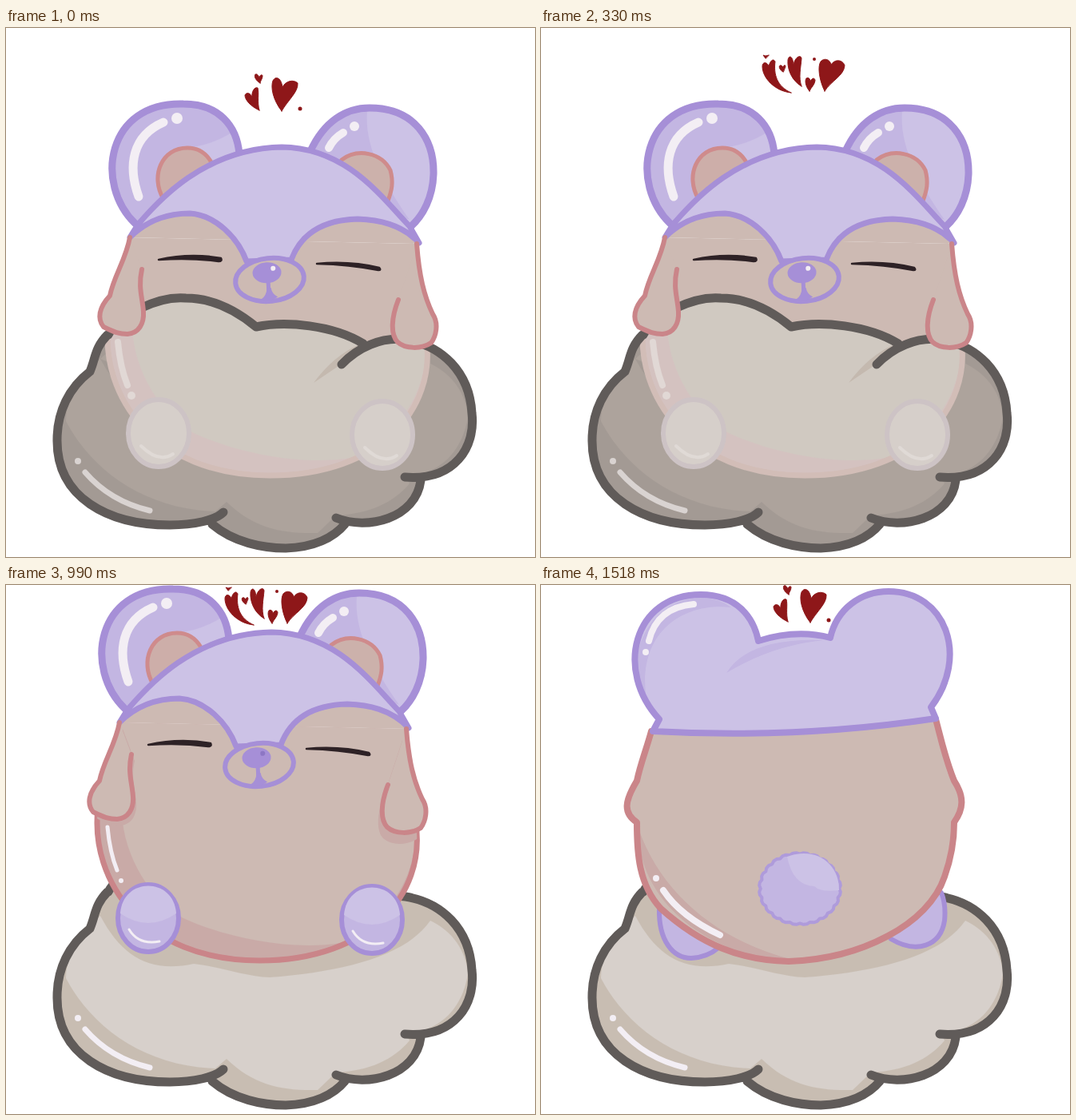
An HTML page for the animation above (1650 ms loop, 662 by 662 pixels).

```html
<!DOCTYPE html>
<html lang="en">
<head>
<meta charset="utf-8">
<title>Sleepy bear on a cloud</title>
<style>
html, body { margin: 0; width: 100%; height: 100%; overflow: hidden; background: #fff; }
svg { display: block; width: 100vw; height: 100vh; }
</style>
</head>
<body>
<svg id="stage" viewBox="0 0 662 662" stroke-linecap="round" stroke-linejoin="round"></svg>
<script>
const STEP = 330;
const lilac = '#ccc2e6', lilacDim = '#c3b6e2', violet = '#a68fd7';
const skin = '#cdbab3', blush = '#c9aaa7', rose = '#ca8589';
const ink = '#2e2226', shine = '#f3eef4', red = '#8e1719', grey = '#605b59';

const fill = (d, color) => `<path d="${d}" fill="${color}"/>`;
const line = (d, color, width) =>
  `<path d="${d}" fill="none" stroke="${color}" stroke-width="${width}"/>`;
const shape = (d, color, stroke, width) =>
  `<path d="${d}" fill="${color}" stroke="${stroke}" stroke-width="${width}"/>`;
const dot = (x, y, r, color = shine) => `<circle cx="${x}" cy="${y}" r="${r}" fill="${color}"/>`;
const oval = (x, y, rx, ry, color, stroke = 'none', width = 0, turn = 0) =>
  `<ellipse cx="${x}" cy="${y}" rx="${rx}" ry="${ry}" fill="${color}" stroke="${stroke}"
    stroke-width="${width}" transform="rotate(${turn} ${x} ${y})"/>`;
const move = (x, y, content) => `<g transform="translate(${x} ${y})">${content}</g>`;
const clip = (id, content) => `<g clip-path="url(#${id})">${content}</g>`;
const clipDef = (id, d) => `<clipPath id="${id}"><path d="${d}"/></clipPath>`;
const eye = d => shape(d, ink, ink, 2.5);

// Cloud
const cloudLeft = 'M127 384C111 400 112 414 105 430C79 450 64 480 64 515C63 588 128 622 205 622C235 622 262 616 272 606';
const cloudBottom = '258 621C285 644 322 651 350 651C385 650 410 638 424 621';
const cloudCorner = '413 613C452 629 513 614 519 566';
const cloudRight = '499 562C562 567 588 524 583 482C580 430 545 397 500 390';
const cloudShape = `${cloudLeft}L${cloudBottom}L${cloudCorner}L${cloudRight}
  C475 387 455 394 447 395C410 372 350 366 313 374C290 355 260 338 225 338C190 335 140 360 128 384Z`;
const cloudLines = `${cloudLeft}M${cloudBottom}M${cloudCorner}M${cloudRight}C470 386 440 400 420 421
  M128 384C140 360 190 335 225 338C260 338 290 355 313 374C350 366 410 372 447 395`;
const cloudLight = `M118 414C92 440 76 460 75 492C105 550 170 602 262 605L276 593C310 626 345 633 390 632
  L413 610C455 608 485 594 505 570L499 560C550 560 574 520 578 485C574 450 552 430 531 420
  C500 465 420 484 330 491C300 490 270 478 235 474C180 486 145 465 118 414Z`;

function cloud(front, belly = '') {
  const light = front ? '#ada39c' : '#d7d0cb';
  const glow = front ? '#d9d3d1' : shine;
  return fill(cloudShape, front ? '#a39a94' : '#c8bdb2') + fill(cloudLight, light)
    + (front ? clip('cloudClip', fill('M118 414L200 340H531V420L330 500Z', light) + belly)
      + fill('M385 444Q410 410 442 396L419 421Z', '#c4b9af') : '')
    + line(cloudLines, grey, 11)
    + line('M99 556Q130 592 180 604', glow, 7) + dot(90, 542, 4, glow);
}

// Hearts
const pair = shape(`M345 104C334 90 331 74 334 66C337 60 344 61 346 74C350 66 360 64 365 69C366 80 353 90 345 104Z
  M317 103C306 98 299 90 299 84C301 80 306 81 308 87C307 80 311 73 315 75C317 82 314 92 317 103Z
  M318 69C313 66 310 61 312 58C315 57 316 60 317 62C318 58 321 58 321 60C321 64 318 66 318 69Z`, red, red, 1)
  + dot(368, 101, 2.5, red);
const cluster = shape(`M355 79C348 65 346 48 350 42C354 37 362 39 363 46C368 38 378 40 380 47C379 60 363 66 355 79Z
  M336 79C331 73 330 66 332 63C335 61 337 64 337 67C339 62 343 62 343 66C342 72 338 74 336 79Z
  M326 73C314 66 308 52 309 40C310 34 315 34 316 46C318 36 325 33 326 38C325 50 322 62 326 73Z
  M313 81C292 79 277 62 277 48C277 42 283 42 285 48C287 40 291 38 293 42C291 58 295 73 313 81Z
  M303 55C299 53 297 48 299 47C301 46 302 48 303 49C304 46 306 46 306 48Z
  M281 38L278 34L281 35L285 34Z`, red, red, 1) + dot(342, 39, 2, red);

// Bear facing forward
const bodyShape = `M155 262C140 300 128 330 128 370C118 460 185 560 330 560C470 560 538 475 526 390
  C530 350 520 310 514 270Z`;
const bodyLight = `M156 262L158 375C160 430 195 485 235 507C290 532 370 548 432 538C490 510 526 460 526 395L514 270Z`;
const bodyEdge = 'M128 370C118 460 185 560 330 560C470 560 538 475 526 390';
const armLeft = 'M155 262C150 290 135 310 130 335C116 350 114 364 122 374C136 381 142 383 152 383C166 382 173 370 172 355C171 338 165 325 170 302';
const armRight = 'M514 270C517 310 523 335 534 358C542 370 538 386 532 394C520 402 500 402 490 393C481 383 482 363 491 340';
const maskShape = `M165 246C186 222 245 151 345 149C425 150 467 208 505 248L517 269
  C495 245 465 240 440 239C400 240 370 255 357 290L301 292C290 262 262 234 230 232C200 232 175 242 155 262Z`;
const earLeft = 'M162 245C110 195 126 92 222 95C266 95 289 122 292 158';
const earRight = 'M381 154C398 117 425 100 455 100C512 100 536 140 535 183C534 212 522 235 506 249';
const innerLeft = 'M197 214C180 185 195 150 227 150C240 150 250 156 257 168';
const innerRight = 'M420 165C440 150 470 156 481 178C485 193 483 203 478 216';

function muzzle(x, y, turn, glint = shine) {
  return `<g transform="translate(${x} ${y}) rotate(${turn})">`
    + oval(0, 0, 43, 27, skin, violet, 6, -3)
    + oval(-3, -9, 18, 13, violet) + dot(5, -14, 3, glint)
    + line('M-2 3V17', violet, 5) + fill('M-4 10Q-5 20 -12 24Q0 28 9 22Q2 18 1 10Z', violet) + '</g>';
}

const frontHead = glint =>
  fill(earLeft, lilacDim) + fill('M225 150Q255 148 284 130L292 162L240 200Z', lilac)
  + line(earLeft, violet, 9)
  + fill(earRight, lilac) + fill('M382 155C400 118 425 101 452 103C448 145 470 190 505 240L470 225Z', lilacDim)
  + line(earRight, violet, 9)
  + shape(innerLeft, '#cdaea9', '#cf8b8c', 5) + shape(innerRight, '#ccb1ab', '#cf8b8c', 5)
  + line('M197 118C158 135 152 172 166 211', shine, 11) + dot(214, 113, 7)
  + line('M422 131Q410 138 404 150', shine, 10) + dot(436, 123, 6)
  + fill('M155 262C190 190 480 190 514 270Z', skin)
  + shape(maskShape, lilac, violet, 7)
  + muzzle(330, 315, -3, glint)
  + eye('M191 290Q230 281 269 288Q271 292 266 292Q230 287 191 290Z')
  + eye('M389 295Q430 291 467 300Q470 303 466 303Q430 296 389 295Z');
const frontArms = [armLeft, armRight].map(d => shape(d, skin, rose, 6)).join('');

const foot = (x, y, muted) => muted
  ? oval(x, y, 38, 42, '#d6cfca', '#cdc3c5', 6) + line(`M${x - 22} ${y + 16}Q${x} ${y + 38} ${x + 18} ${y + 26}`, '#e0dad6', 4)
  : oval(x, y, 38, 42, lilacDim, violet, 6)
    + fill(`M${x - 35} ${y - 6}C${x - 32} ${y - 52} ${x + 32} ${y - 52} ${x + 35} ${y - 6}Q${x} ${y + 18} ${x - 35} ${y - 6}Z`, lilac)
    + line(`M${x - 24} ${y + 14}Q${x - 12} ${y + 34} ${x + 14} ${y + 29}`, shine, 3);

function frontBelly(muted) {
  const glow = muted ? '#e1d8d5' : shine;
  return fill(bodyShape, muted ? '#d4c2c0' : blush) + clip('bodyClip', fill(bodyLight, muted ? '#d0c9c1' : skin))
    + line(bodyEdge, muted ? '#d2bdb7' : rose, 7)
    + (muted ? '' : clip('bodyClip', move(4, 8, fill(armLeft, blush)) + move(-5, 14, fill(armRight, blush))))
    + line('M140 393Q143 425 152 447', glow, muted ? 8 : 5) + dot(157, 460, muted ? 5 : 3, glow)
    + foot(191, 507, muted) + foot(471, 509, muted);
}

const resting = fill(bodyShape, skin) + frontHead(shine) + cloud(true, frontBelly(true)) + frontArms;
const jumping = cloud(false) + move(-13, -90, frontBelly(false) + frontHead('#8d77c4') + frontArms);

// Bear leaning to one side
function leaning() {
  const left = 'M120 264C43 225 43 103 143 101C175 100 195 115 206 136';
  const right = 'M289 101C292 50 325 17 367 17C420 17 443 57 443 97C443 122 440 136 435 148';
  const innerLeft = 'M135 217C108 187 122 153 152 153Q166 153 176 160';
  const innerRight = 'M332 98C341 70 388 67 396 97Q398 107 395 119';
  const mask = `M121 265C138 200 193 112 290 102C350 98 405 120 450 153C370 148 320 190 316 237L265 256
    C240 234 215 226 195 226C170 226 140 250 116 288Z`;
  const body = `M116 288C113 330 120 370 133 395C155 480 235 514 310 514C390 512 455 472 487 434
    C515 405 524 380 523 355C525 290 490 210 450 153Z`;
  const arm = 'M117 310C116 350 122 380 130 401C160 400 194 380 202 354C204 338 190 332 174 337Q163 341 158 347Q151 335 149 321';
  const belly = fill(body, '#d4c2c0')
    + fill('M160 395C185 447 235 478 300 478C380 476 445 455 490 430L523 340L180 320Z', '#d0c9c1')
    + line('M133 395C155 480 235 514 310 514C390 512 455 472 487 434', '#d2bdb7', 6)
    + line('M157 411Q165 433 180 450', '#e1d8d5', 9) + dot(190, 463, 6, '#e1d8d5')
    + foot(241, 499, true) + oval(503, 395, 40, 41, '#d4ccc8', '#cdc3c5', 5);
  return fill(left, lilacDim) + fill('M160 152Q180 128 199 126L206 136L165 180Z', lilac) + line(left, violet, 9)
    + fill(right, lilac) + fill('M289 101C292 58 315 28 341 22C343 52 365 80 412 122L330 112Z', lilacDim) + line(right, violet, 9)
    + shape(innerLeft, '#cdb3ac', '#b9733d', 6) + shape(innerRight, '#ccb3ab', '#b9733d', 6)
    + line('M102 131C70 155 73 206 102 233', shine, 10) + dot(112, 123, 5)
    + line('M320 58Q306 72 303 92', shine, 9) + dot(325, 48, 5)
    + fill(body, skin) + fill('M523 355Q507 345 509 315L514 270Z', blush)
    + fill('M116 288C150 190 380 120 450 153Z', skin)
    + line('M116 288C113 330 120 370 130 400M450 155C490 210 526 290 524 362', rose, 8)
    + shape(mask, lilac, violet, 7) + muzzle(300, 270, -22)
    + eye('M162 297Q195 274 234 268Q236 271 232 272Q195 280 162 297Z')
    + eye('M347 228Q385 207 423 205Q425 207 420 208Q385 213 347 228Z')
    + oval(503, 395, 40, 41, lilac, violet, 6) + cloud(true, belly)
    + fill(arm, skin) + line(arm, rose, 6)
    + shape('M365 328C350 350 344 390 368 401C398 408 420 385 417 336', skin, rose, 6);
}

// Bear seen from behind
const hat = `M140 183L148 168C92 108 115 12 200 12C245 12 266 40 272 70Q320 55 362 66
  C370 30 400 8 435 8C507 8 536 90 488 153L494 167Q320 193 140 183Z`;

function turned() {
  const body = `M138 183C132 205 124 225 120 245C105 270 102 285 120 297C120 335 122 375 150 405
    C200 450 250 470 310 471C400 468 485 425 505 365C514 340 517 315 517 297C529 280 530 265 517 245C505 215 500 190 494 168`;
  const points = Array.from({ length: 72 }, (_, i) => {
    const a = i * Math.PI / 36, bump = i % 3 ? 1 : 0.965;
    return `${(324 + 51 * bump * Math.cos(a)).toFixed(1)} ${(380 + 45 * bump * Math.sin(a)).toFixed(1)}`;
  });
  return cloud(false)
    + shape('M148 405C147 445 165 467 188 467Q208 466 222 454', lilacDim, violet, 6)
    + shape('M438 443C470 462 500 452 505 420Q507 400 501 385', lilacDim, violet, 6)
    + fill(body, skin) + fill('M122 305C150 385 220 445 315 469C220 470 120 400 122 305Z', blush)
    + line(body, rose, 8)
    + line('M153 382Q175 415 224 438', shine, 8) + dot(144, 367, 4)
    + fill(hat, lilac)
    + clip('hatClip', fill('M140 175C98 120 118 20 200 16Q222 16 238 28C170 20 105 70 140 175Z', lilacDim))
    + fill('M232 110Q260 65 355 69Q290 75 232 110Z', lilacDim)
    + line(hat, violet, 8)
    + line('M135 70Q145 28 191 24', shine, 8) + dot(131, 84, 4)
    + shape(`M${points.join('L')}Z`, lilacDim, '#af9bdb', 4)
    + fill('M308 340C345 326 374 350 373 382Q350 385 342 377Q315 376 308 340Z', lilac);
}

const tiltedPair = `<g transform="translate(240 88) rotate(-14) translate(-345 -104)">${pair}</g>`;
const poses = [
  resting + pair,
  resting + cluster,
  leaning() + tiltedPair,
  jumping + move(-3, -31, cluster),
  turned() + move(-8, -57, pair)
];
const stage = document.getElementById('stage');
stage.innerHTML = `<defs>${clipDef('cloudClip', cloudShape)}${clipDef('bodyClip', bodyShape)}${clipDef('hatClip', hat)}</defs>`
  + poses.map(content => `<g display="none">${content}</g>`).join('');
const groups = stage.querySelectorAll(':scope > g');
const start = performance.now();

function draw(now) {
  const current = Math.floor(Math.max(0, now - start) / STEP) % poses.length;
  groups.forEach((group, i) => group.setAttribute('display', i === current ? 'inline' : 'none'));
}
function tick(now) {
  draw(now);
  requestAnimationFrame(tick);
}
draw(start);
requestAnimationFrame(tick);
</script>
</body>
</html>
```
